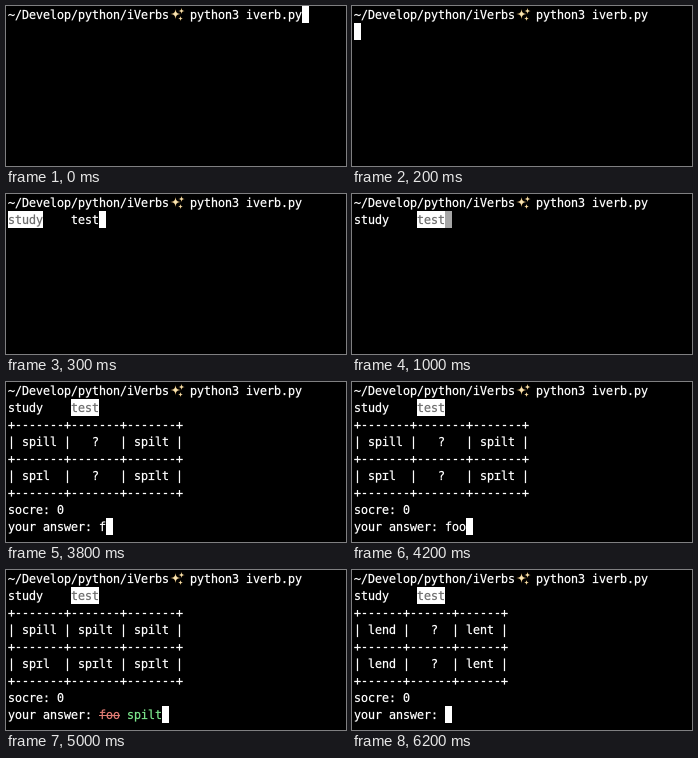
Write an HTML page with a canvas that moves like this. It is 340 px wide and 160 px high and loops after 7100 ms.

```html
<!DOCTYPE html>
<html lang="en">
<head>
<meta charset="utf-8">
<title>Verb quiz in a terminal</title>
<style>
  html, body { margin: 0; height: 100%; overflow: hidden; background: #000; }
  canvas { display: block; width: 340px; height: 160px; }
</style>
</head>
<body>
<canvas id="screen"></canvas>
<script>
const LOOP = 7100, CELL = 7, LINE = 17, LEFT = 2, BASELINE = 13;
const WHITE = '#fff', DIM = '#6e6e6e', RED = '#e07c74', GREEN = '#7ce68c';

// Drawn at double density, so that scaling down softens the glyph edges.
const canvas = document.getElementById('screen');
const scale = 2 * (window.devicePixelRatio || 1);
canvas.width = 340 * scale;
canvas.height = 160 * scale;
const ctx = canvas.getContext('2d');
ctx.scale(scale, scale);

const colX = col => LEFT + col * CELL;

function box(row, col, cells, color) {
  ctx.fillStyle = color;
  ctx.fillRect(colX(col), row * LINE, cells * CELL, LINE);
}

// Every character sits in its own terminal cell.
function print(row, col, text, color = WHITE) {
  ctx.fillStyle = ctx.strokeStyle = color;
  [...text].forEach((char, i) => {
    const x = colX(col + i) + CELL / 2, y = row * LINE + BASELINE;
    ctx.fillText(char, x, y);
    ctx.strokeText(char, x, y);
  });
}

const cursor = (row, col, color = WHITE) => box(row, col, 1, color);

function star(x, y, r, color) {
  ctx.fillStyle = color;
  ctx.beginPath();
  ctx.moveTo(x, y - r);
  for (const [dx, dy] of [[1, 0], [0, 1], [-1, 0], [0, -1]]) {
    ctx.quadraticCurveTo(x, y, x + dx * r, y + dy * r);
  }
  ctx.fill();
}

function sparkles() {
  for (const [x, y, r] of [[169.5, 8, 5.5], [175.5, 5, 3.4], [174.5, 12.5, 2.8]]) {
    star(x, y, r, '#d9a95a');
    star(x, y, r * 0.8, '#f6e3b4');
  }
}

function prompt() {
  print(0, 0, '~/Develop/python/iVerbs');
  sparkles();
  print(0, 26, 'python3 iverb.py');
}

function menu(selected) {
  [['study', 0], ['test', 9]].forEach(([label, col], i) => {
    if (i === selected) box(1, col, label.length, WHITE);
    print(1, col, label, i === selected ? DIM : WHITE);
  });
}

function quiz(rows) {
  const width = rows[0][0].length;
  const blank = ' '.repeat(Math.ceil((width - 1) / 2)) + '?';
  const border = '+' + ('-'.repeat(width + 2) + '+').repeat(3);
  rows.forEach((words, i) => {
    const cells = words.map(word => (word || blank).padEnd(width));
    print(2 + i * 2, 0, border);
    print(3 + i * 2, 0, `| ${cells.join(' | ')} |`);
  });
  print(6, 0, border);
  print(7, 0, 'socre: 0');
  print(8, 0, 'your answer: ');
}

function answer(text) {
  print(8, 13, text);
  cursor(8, 13 + text.length);
}

function correction() {
  print(8, 13, 'foo', RED);
  ctx.fillRect(colX(13), 8 * LINE + 9, 3 * CELL, 1);
  print(8, 17, 'spilt', GREEN);
  cursor(8, 22);
}

const spill = solved => [
  ['spill', solved && 'spilt', 'spilt'],
  ['spɪl', solved && 'spɪlt', 'spɪlt']
];
const lend = [['lend', '', 'lent'], ['lend', '', 'lent']];

function draw(t) {
  ctx.fillStyle = '#000';
  ctx.fillRect(0, 0, 340, 160);
  ctx.font = '12px "DejaVu Sans Mono", monospace';
  ctx.textAlign = 'center';
  ctx.lineJoin = 'round';
  ctx.lineWidth = 0.2;
  prompt();

  if (t < 100) return cursor(0, 42);
  if (t < 300) return cursor(1, 0);

  menu(t < 1000 ? 0 : 1);
  if (t < 1800) return cursor(1, 13, t < 1000 ? WHITE : '#a6a6a6');

  if (t >= 6200) {
    quiz(lend);
    answer('');
    return;
  }
  quiz(spill(t >= 4900));
  if (t >= 5000) correction();
  else answer(t < 3800 ? '' : t < 4100 ? 'f' : t < 4200 ? 'fo' : 'foo');
}

const start = performance.now();
function tick() {
  draw((performance.now() - start) % LOOP);
  requestAnimationFrame(tick);
}
tick();
</script>
</body>
</html>
```
